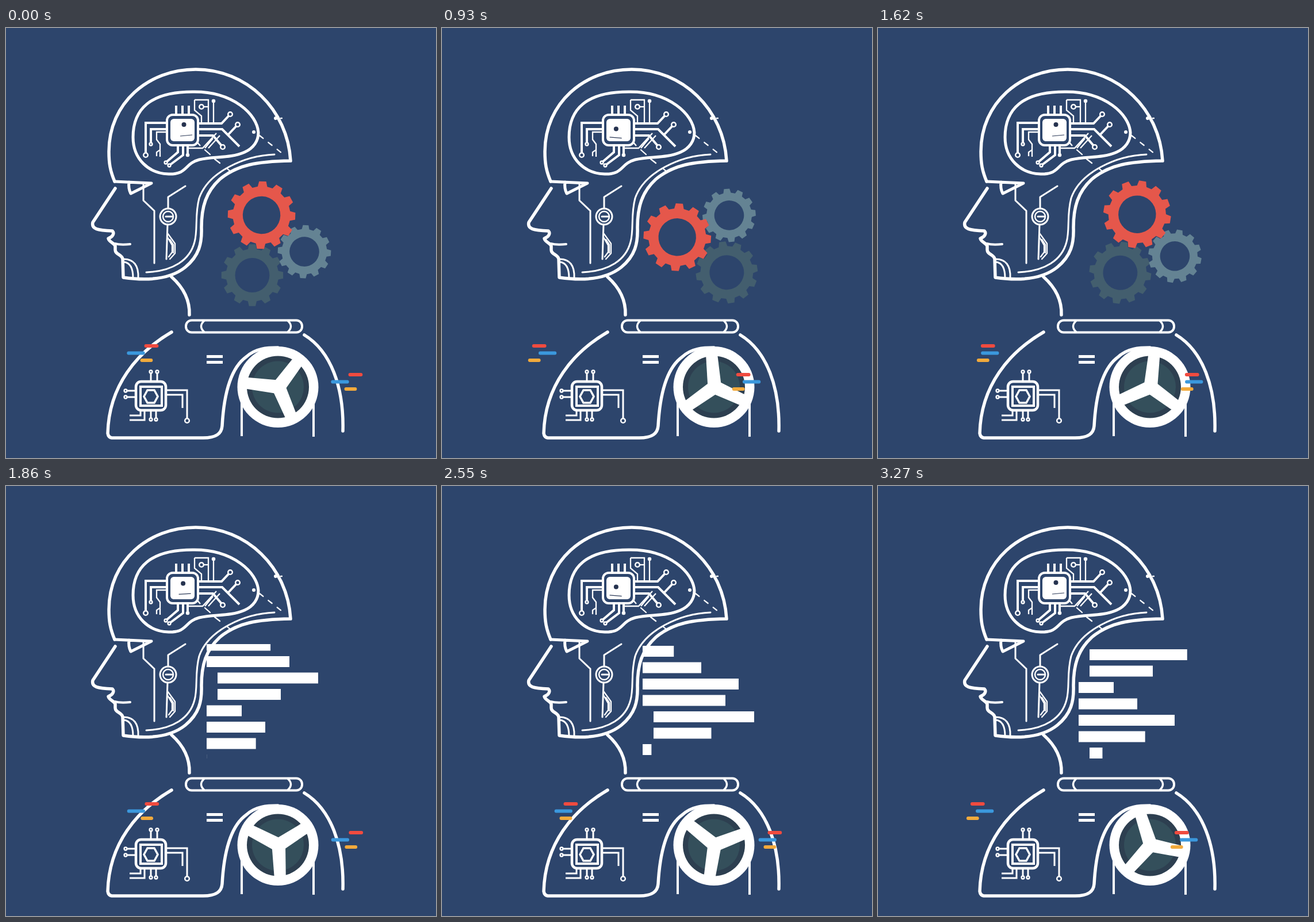
An HTML page that plays this animation: 748x748 px, repeating every 3300 ms.

```html
<!DOCTYPE html>
<html lang="en">
<head>
<meta charset="utf-8">
<title>Thinking machine</title>
<style>
html, body { margin: 0; width: 100%; height: 100%; overflow: hidden; background: #2d456c; }
svg { display: block; width: 100vw; height: 100vh; }
.ln { fill: none; stroke: #fff; stroke-linecap: round; stroke-linejoin: round; }
.sq { stroke-linecap: butt; stroke-linejoin: miter; }
.ring { marker-end: url(#ring); }
.bead { marker-end: url(#bead); }
.dot { marker-end: url(#pin); }
marker { overflow: visible; }
marker circle { fill: #2d456c; stroke: #fff; stroke-width: 2.5; }
</style>
</head>
<body>
<svg viewBox="0 0 748 748">
  <defs>
    <clipPath id="pane"><rect x="340" y="275" width="220" height="199"/></clipPath>
    <marker id="ring" markerUnits="userSpaceOnUse"><circle r="3.8"/></marker>
    <marker id="bead" markerUnits="userSpaceOnUse"><circle r="2.4"/></marker>
    <marker id="pin" markerUnits="userSpaceOnUse"><circle r="2" style="fill:#fff"/></marker>
  </defs>

  <!-- head -->
  <g class="ln" stroke-width="5.5">
    <path d="M189 267C181 248 179 235 179 215C179 131 247 72 330 72C419 72 490 142 495 231C437 232 402 238 372 263C348 285 340 311 340 347C341 375 336 396 312 416C286 437 246 440 204 434L203 402C202 394 190 394 190 386V379C187 373 179 372 178 366C186 363 189 357 185 353C160 352 148 350 151 338L190 279"/>
    <path stroke-width="4" d="M189 375C196 377 207 377 216 376"/>
    <path stroke-width="5" d="M189 267L253 270L217 288C214 282 213 275 214 268"/>
    <path stroke-width="5" d="M439 182C437 150 395 111 328 111C250 110 221 142 221 190C221 228 248 253 283 254C316 255 310 236 336 229C362 223 390 227 415 216C431 209 439 196 439 182Z"/>
    <path d="M288 433C307 450 320 472 319 499"/>
  </g>
  <g class="ln" stroke-width="3">
    <path d="M467 220C415 222 352 250 336 296C328 326 334 350 328 372C320 404 290 423 244 425"/>
    <path d="M205 402C222 402 231 413 230 435M205 407C215 408 221 416 221 435"/>
    <path d="M239 272V300L258 318V409M312 275L282 294V314M281 342L279 402"/>
    <path stroke-width="2.3" d="M281 357L294 375V392L285 402M281 364L289 378V390L283 398M285 368L291 377V391"/>
    <circle cx="282" cy="328" r="14"/>
    <circle cx="282" cy="328" r="9" stroke-width="2.5"/>
    <path d="M278 328H290"/>
    <path stroke-width="2.3" d="M346 212L355 220M363 228L372 235M384 244L391 250M478 157H480"/>
    <path stroke-width="2.3" stroke-dasharray="8 11.5" d="M441 187L483 220"/>
    <path stroke-width="6" d="M469 157h.1M431 181h.1"/>
  </g>

  <!-- brain circuits -->
  <g class="ln sq" stroke-width="4">
    <path d="M296 135V150M307 135V150M318 135V150M334 176H376L406 206"/>
    <g class="ring">
      <path d="M279 165H243V221"/>
      <path d="M334 166H375L390 150"/>
      <path d="M387 185L403 168"/>
      <path d="M334 187H360L377 207"/>
      <path d="M352 137H340" stroke-width="2.3"/>
    </g>
    <g class="bead">
      <path d="M279 176H252V202"/>
      <path d="M299 204V216L278 234"/>
      <path d="M308 204V221L284 239"/>
    </g>
    <path class="dot" d="M316 204V221"/>
    <g stroke-width="2.3">
      <path class="dot" d="M361 166V127"/>
      <path d="M279 181H262V194L268 202V212L262 216V223M268 210V224M328 125H352V166M328 125V143L340 153V166M318 209H342L366 183M346 209L360 192M352 209L372 187M332 198L338 205"/>
    </g>
    <rect x="280" y="151" width="54" height="53" rx="10"/>
  </g>
  <rect x="286" y="158" width="42" height="39" rx="6" fill="#fff"/>
  <path id="mark" stroke="#2d3b58" stroke-width="1.2"/>
  <circle id="dot" r="4" fill="#26334f"/>

  <!-- torso -->
  <g class="ln" stroke-width="5.5">
    <path d="M288 529C228 564 179 622 177 705Q178 712 184 713H343C365 713 375 706 376 692C379 638 390 592 418 572C434 557 455 556 473 556M519 534C565 562 588 625 586 701"/>
    <rect x="313" y="508.5" width="202" height="21" rx="10" stroke-width="4"/>
    <path stroke-width="3.5" d="M345 509Q334 519 345 529M490 509Q501 519 490 529"/>
    <path class="sq" stroke-width="4" d="M410 640V710M535 640V711"/>
    <path class="sq" stroke-width="5" d="M349 571.5H377M349 581.5H377"/>
  </g>
  <g class="ln sq" stroke-width="3">
    <rect x="226" y="615" width="52" height="50" rx="9" stroke-width="4.5"/>
    <rect x="234" y="624" width="37" height="33" stroke-width="4"/>
    <path d="M240 641L246 630H258L264 641L258 652H246Z" stroke-width="3.5"/>
    <path d="M278 638H307V661M241 665V682H215M234 665V674H215"/>
    <path class="ring" d="M278 630H315V683"/>
    <g class="bead">
      <path d="M252 615V598"/>
      <path d="M263 615V598"/>
      <path d="M226 631H208"/>
      <path d="M226 642H208"/>
      <path d="M252 665V681"/>
      <path d="M261 665V681"/>
    </g>
  </g>

  <!-- wheel -->
  <circle cx="473" cy="624.5" r="70.5" fill="#fff"/>
  <circle cx="473" cy="624.5" r="54" fill="#2d3f50"/>
  <circle cx="473" cy="624.5" r="45" fill="#344f5b"/>
  <g id="wheel" fill="#fff"></g>

  <g id="gears"></g>
  <g id="code" fill="#fff" clip-path="url(#pane)"></g>
  <g id="dashes" stroke-width="5.8" stroke-linecap="round"></g>
</svg>

<script>
const $ = id => document.getElementById(id);
const rad = Math.PI / 180;
const cosd = deg => Math.cos(deg * rad);
const sind = deg => Math.sin(deg * rad);

function set(el, attrs) {
  for (const k in attrs) el.setAttribute(k, attrs[k]);
}
function add(parent, tag, attrs) {
  const el = document.createElementNS('http://www.w3.org/2000/svg', tag);
  set(el, attrs);
  return parent.appendChild(el);
}
const smooth = v => {
  v = Math.max(0, Math.min(1, v));
  return v * v * (3 - 2 * v);
};

for (let i = 0; i < 3; i++)
  add($('wheel'), 'path', { d: 'M-12 6L-10 -57H10L12 6Z', transform: `rotate(${i * 120})` });

// Twelve-toothed gear with a round hole
function gearPath(tip) {
  const root = tip * 0.85, hole = tip * 0.555;
  let d = '';
  for (let i = 0; i < 12; i++)
    for (const [off, r] of [[-9.5, root], [-6, tip], [6, tip], [9.5, root]]) {
      const a = i * 30 + off;
      d += `${d ? 'L' : 'M'}${r * sind(a)} ${-r * cosd(a)}`;
    }
  return `${d}ZM${hole} 0A${hole} ${hole} 0 1 0 ${-hole} 0A${hole} ${hole} 0 1 0 ${hole} 0Z`;
}
const gears = [
  { x: -29.5, y: 56.7, tip: 54, fill: '#435e6e', start: 0, spin: -5 },
  { x: 61, y: 15.7, tip: 46.5, fill: '#648393', start: 3, spin: -5 },
  { x: -13.5, y: -47.8, tip: 59, fill: '#e5574b', start: 1.8, spin: 5 }
];
for (const g of gears)
  g.el = add($('gears'), 'path', { d: gearPath(g.tip), fill: g.fill, 'fill-rule': 'evenodd' });

const widths = [61, 102, 167, 144, 175, 110];
const bars = Array.from({ length: 9 }, () => add($('code'), 'rect', { height: 19 }));

// Two stacks of sliding dashes; the blue one swings half as far
const dashes = [];
for (const side of [0, 1])
  ['#f04b3f', '#3b98dd', '#f2aa3c'].forEach((stroke, i) => {
    const y = 553 + 12.5 * i + 50 * side;
    dashes.push({
      x: 202.5 - (i ? 13 - 3 * i : 0) + 355 * side,
      swing: i === 1 ? 22 : 43.5,
      len: [19, 25.5, 16][i],
      el: add($('dashes'), 'line', { y1: y, y2: y, stroke })
    });
  });

function drawChip(n) {
  const c = cosd(n * 360 / 54);
  set($('dot'), { cx: 306 + 3.5 * c, cy: 172 - 4 * c });
  set($('mark'), { d: `M${297 + 6 * c} ${189 - c}l21 ${-2 * c}` });
}

function drawDashes(n) {
  const a = 18 * (n - 1);
  const u = Math.cos(a * rad + 0.07 - 0.105 * cosd(a));
  for (const d of dashes) {
    const x1 = d.x + d.swing * u;
    set(d.el, { x1, x2: x1 + d.len });
  }
}

function drawGears(n) {
  const turn = -23.4 + 43.4 * cosd(6.9 * (n - 8.3));
  set($('gears'), { transform: `translate(458 373.3) rotate(${turn})` });
  for (const g of gears)
    set(g.el, { transform: `translate(${g.x} ${g.y}) rotate(${g.start + g.spin * n})` });
}

// Lines scroll up, growing at the bottom edge and shrinking at the top
function drawCode(n) {
  const scroll = 660.5 - 4.5 * n;
  const first = Math.ceil((246 - scroll) / 28.5);
  bars.forEach((bar, i) => {
    const y = scroll + 28.5 * (first + i), k = (first + i + 60) % 6;
    const shown = smooth((468 - y) / 58) * (1 - smooth((290 - y) / 58));
    set(bar, { x: k < 4 ? 349 : 368, y, width: widths[k] * shown });
  });
}

function draw(n) {
  const geared = n < 55;
  set($('gears'), { display: geared ? 'inline' : 'none' });
  set($('code'), { display: geared ? 'none' : 'inline' });
  (geared ? drawGears : drawCode)(n);
  set($('wheel'), { transform: `translate(474.2 624.5) rotate(${37 + 6.38 * (n % 40)})` });
  drawChip(n);
  drawDashes(n);
}

const begin = performance.now();
function tick() {
  draw(Math.floor((performance.now() - begin) % 3300 / 30));
  requestAnimationFrame(tick);
}
tick();
</script>
</body>
</html>
```
